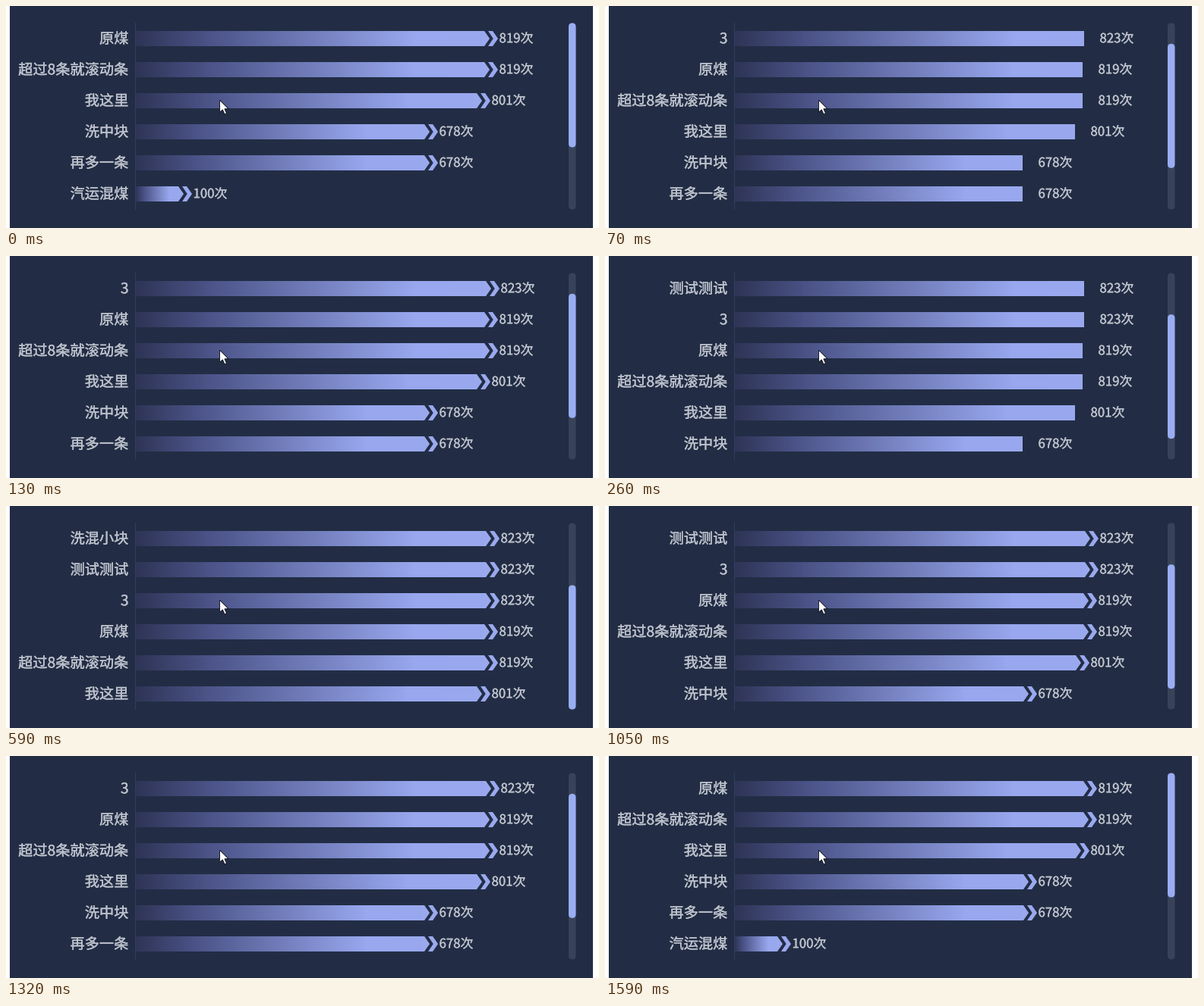
Write a matplotlib script that moves like this. It is 781 by 293 pixels and loops after 1.66 s.

```python
import matplotlib.pyplot as plt
import numpy as np
from matplotlib.animation import FuncAnimation
from matplotlib.colors import LinearSegmentedColormap
from matplotlib.patches import FancyBboxPatch, Polygon, Rectangle
from matplotlib.patheffects import withStroke

W, H, DPI = 781, 293, 64
LOOP, TICK = 1660, 10
PT = 72 / DPI

BG, AXIS, TRACK = "#222d45", "#303c62", "#38435a"
THUMB, TEXT, LIGHT = "#99adf3", "#bdc2cc", "#9aa9ee"
FONT = "Noto Sans CJK JP"

DATA = [
    ("洗混小块", 823), ("测试测试", 823), ("3", 823),
    ("原煤", 819), ("超过8条就滚动条", 819), ("我这里", 801),
    ("洗中块", 678), ("再多一条", 678), ("汽运混煤", 100),
]
ROWS, ROW_STEP = 6, 41
BAR_X, BAR_TOP, BAR_H = 171, 33, 20
SCALE = 0.56
TRACK_TOP, TRACK_H = 22.5, 246
SLOT = TRACK_H / len(DATA)

# (start ms, first visible item, arrow heads shown)
STEPS = [
    (0, 3, True), (70, 2, False), (130, 2, True), (260, 1, False),
    (330, 1, True), (460, 0, False), (590, 0, True),
    (1050, 1, True), (1320, 2, True), (1590, 3, True),
]

fig = plt.figure(figsize=(W / DPI, H / DPI), dpi=DPI, facecolor="white")
ax = fig.add_axes([0, 0, 1, 1])
ax.axis("off")

ramp = LinearSegmentedColormap.from_list("bar", [
    (0, "#2f3556"), (0.2, "#4a5286"), (0.8, "#98a7ee"), (1, LIGHT)])


def label(x, y, px, align):
    return ax.text(x, y, "", family=FONT, size=px * PT, color=TEXT,
                   ha=align, va="baseline", zorder=3,
                   path_effects=[withStroke(linewidth=0.35 * PT,
                                            foreground=TEXT)])


def pill(x, y, w, h, color):
    shape = FancyBboxPatch((x, y), w, h, fc=color, ec="none", zorder=2,
                           boxstyle=f"round,pad=0,rounding_size={w / 2}")
    return ax.add_patch(shape)


class Row:
    """One bar with its name, value and arrow head."""

    def __init__(self, i):
        self.top = BAR_TOP + i * ROW_STEP
        self.bar = ax.imshow(np.linspace(0, 1, 512)[None], cmap=ramp,
                             aspect="auto", interpolation="bilinear", zorder=2)
        self.heads = [ax.add_patch(Polygon([(0, 0)] * 3, fc=LIGHT, ec="none",
                                           zorder=2)) for _ in range(2)]
        self.name = label(161.5, self.top + 16.3, 19.2, "right")
        self.value = label(0, self.top + 15.2, 16.8, "left")

    def show(self, name, value, arrow):
        top, mid, low = self.top, self.top + BAR_H / 2, self.top + BAR_H
        end = round(BAR_X - 0.5 + value * SCALE)
        # a hair inside whole pixels, so rounding never adds a pixel
        e = 0.01
        self.bar.set_extent((BAR_X + e, end - e, low - e, top + e))
        tip, chevron = self.heads
        tip.set_xy([(end, top), (end + 1, top), (end + 8, mid),
                    (end + 1, low), (end, low)])
        chevron.set_xy([(end + 6, top), (end + 12, top), (end + 19, mid),
                        (end + 12, low), (end + 6, low), (end + 12.7, mid)])
        for head in self.heads:
            head.set_visible(arrow)
        self.name.set_text(name)
        self.value.set_text(f"{value}次")
        self.value.set_x(end + 20.5)


ax.add_patch(Rectangle((5, 0), 768, H, fc=BG, ec="none", zorder=0))
ax.add_patch(Rectangle((170, 22), 1, 247, fc=AXIS, ec="none", zorder=1))
rows = [Row(i) for i in range(ROWS)]

pill(741, TRACK_TOP, 9.5, TRACK_H, TRACK)
thumb = pill(741, TRACK_TOP, 9.5, SLOT * ROWS, THUMB)

pointer = np.array([(0, 0), (0, 16), (3.8, 12.6), (6.4, 18.6), (9, 17.4),
                    (6.4, 11.6), (11.4, 11.4)])
ax.add_patch(Polygon(pointer + (281.5, 124.2), fc="white", ec="#10141f",
                     lw=0.9 * PT, zorder=5))

ax.set_xlim(0, W)
ax.set_ylim(H, 0)


def draw(frame):
    t = frame * TICK
    _, first, arrow = [s for s in STEPS if s[0] <= t][-1]
    for row, item in zip(rows, DATA[first:first + ROWS]):
        row.show(*item, arrow)
    # the thumb sinks as the list runs back to its first item
    thumb.set_y(TRACK_TOP + SLOT * (len(DATA) - ROWS - first))
    return []


anim = FuncAnimation(fig, draw, frames=LOOP // TICK, interval=TICK,
                     init_func=lambda: draw(0), repeat=True, repeat_delay=0)
plt.show()
```
